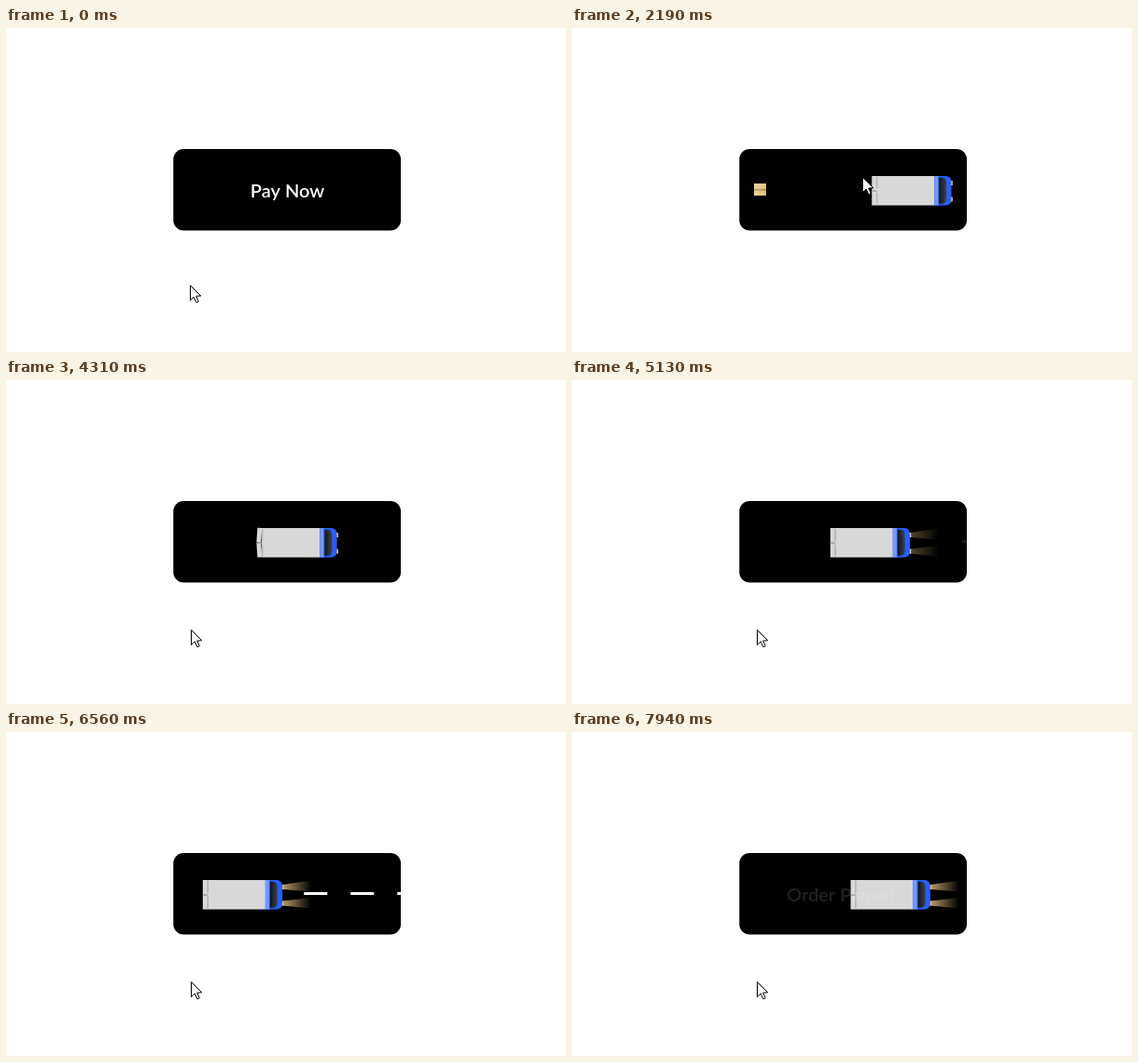
An HTML page with a canvas that plays this animation: 600x348 px, repeating every 8000 ms.

```html
<!DOCTYPE html>
<html lang="en">
<head>
<meta charset="utf-8">
<title>Pay button</title>
<style>
html, body { margin: 0; width: 100%; height: 100%; overflow: hidden; background: #fff; }
canvas { display: block; }
</style>
</head>
<body>
<canvas id="stage" width="600" height="348"></canvas>
<script>
const ctx = document.getElementById('stage').getContext('2d');
const LOOP = 8, FPS = 16;
const BUTTON = { x: 179.3, y: 130, w: 243.7, h: 87.5, r: 11 };
const FONT = '600 20px Lato, sans-serif';

const clamp = v => Math.min(1, Math.max(0, v));
const mix = (a, b, p) => a + (b - a) * p;
const ramp = (t, from, to) => clamp((t - from) / (to - from));

// CSS "ease": cubic-bezier(.25, .1, .25, 1)
function ease(x) {
  if (x <= 0 || x >= 1) return clamp(x);
  let lo = 0, hi = 1;
  for (let i = 0; i < 22; i++) {
    const s = (lo + hi) / 2;
    if (.75 * s - .75 * s * s + s ** 3 < x) lo = s; else hi = s;
  }
  return .3 * lo * (1 - lo) ** 2 + 3 * lo * lo * (1 - lo) + lo ** 3;
}
const smooth = x => x * x * (3 - 2 * x);

function track(t, keys, curve = ease) {
  if (t <= keys[0][0]) return keys[0][1];
  for (let i = 1; i < keys.length; i++) {
    const [t0, v0] = keys[i - 1], [t1, v1] = keys[i];
    if (t < t1) return mix(v0, v1, curve((t - t0) / (t1 - t0)));
  }
  return keys[keys.length - 1][1];
}

const truckX = t => t < 7.13
  ? track(t, [[1.86, 440], [2.66, 269.3], [4.6, 269.3], [5.8, 279.5], [7.3, 190]])
  : mix(191, 376, ease((t - 7.13) / 2.4));
const parcelX = t => track(t, [[1.86, 166], [2.62, 206], [3.2, 282]]);
const doorOpen = t => track(t, [[2.5, 0], [3.25, 1], [3.84, 1], [4.4, 0]]);
const cursorX = t => track(t, [[.64, 197], [1.31, 320], [2.06, 320], [2.19, 311], [2.72, 199], [3, 198]], smooth);
const cursorY = t => track(t, [[.64, 276], [1.31, 161], [2.06, 161], [2.19, 160], [2.72, 267], [3, 268]], smooth);

function rect(x, y, w, h, fill) {
  ctx.fillStyle = fill;
  ctx.fillRect(x, y, w, h);
}

function round(x, y, w, h, radii, fill) {
  ctx.beginPath();
  ctx.roundRect(x, y, w, h, radii);
  ctx.fillStyle = fill;
  ctx.fill();
}

function poly(points, fill) {
  ctx.beginPath();
  points.forEach(([x, y]) => ctx.lineTo(x, y));
  ctx.closePath();
  ctx.fillStyle = fill;
  ctx.fill();
}

function gradient(x0, x1, from, to) {
  const g = ctx.createLinearGradient(x0, 0, x1, 0);
  g.addColorStop(0, from);
  g.addColorStop(1, to);
  return g;
}

function label(text, x, align, alpha) {
  if (alpha <= 0) return;
  ctx.font = FONT;
  ctx.textAlign = align;
  ctx.fillStyle = `rgba(255,255,255,${alpha})`;
  ctx.fillText(text, x, 181.5);
}

function lines(t) {
  const alpha = ramp(t, 5.1, 5.35) * (1 - ramp(t, 7.3, 7.7));
  if (!alpha) return;
  const start = 423 - 400 * ease((t - 5.01) / 5);
  ctx.globalAlpha = alpha;
  for (let x = start; x < 424; x += 50) rect(x, 172, 25, 3, '#fff');
  ctx.globalAlpha = 1;
}

function parcel(x) {
  rect(x, 167, 13, 13, gradient(x, x + 13, '#edd09a', '#e2bd7c'));
  rect(x, 172.5, 13, 2.5, 'rgba(90,55,0,.2)');
  rect(x, 173.5, 13, 1, 'rgba(90,55,0,.2)');
}

function door(x, open, side) {
  const angle = mix(0, 1.47, open), thick = mix(5, 2.6, open);
  const along = [-Math.sin(angle) * 16, Math.cos(angle) * 15.7];
  const out = [-Math.cos(angle) * thick, -Math.sin(angle) * thick];
  const px = x + 5, py = mix(-15.7, -13.2, open);
  const point = (a, o) => [px + along[0] * a + out[0] * o, 174.7 + side * (py + along[1] * a + out[1] * o)];
  poly([point(0, 0), point(1, 0), point(1, 1), point(0, 1)], '#d8d8d8');
}

function truck(x, t) {
  const open = doorOpen(t);
  door(x, open, 1);
  door(x, open, -1);
  rect(x + 4.6, 159, 62.6, 31.5, '#d8d8d8');
  if (open < .05) {
    rect(x + 5, 160, 1, 12.5, '#aaa');
    rect(x + 5, 177, 1, 12.5, '#aaa');
    rect(x, 175, 5.5, 1, '#aaa');
  }

  const lit = ramp(t, 4.6, 5.8);
  for (const [y, top, bottom] of [[164, 159.5, 171.5], [181.5, 178, 189.5]]) {
    rect(x + 84.5, y, 2, 5, mix(0, 1, lit) > .7 ? '#e8d3a0' : '#f2dfa6');
    if (!lit) continue;
    ctx.globalAlpha = lit;
    poly([[x + 85.5, y], [x + 116, top], [x + 116, bottom], [x + 85.5, y + 5]],
      gradient(x + 85, x + 116, 'rgba(222,188,124,.85)', 'rgba(222,188,124,0)'));
    ctx.globalAlpha = 1;
  }

  round(x + 67, 159, 18.3, 31.5, [0, 6, 6, 0], '#275efe');
  rect(x + 67, 159, 5, 31.5, '#7699ff');
  rect(x + 71, 159, 1, 31.5, '#275efe');
  ctx.beginPath();
  ctx.moveTo(x + 72, 160.5);
  ctx.lineTo(x + 77, 161);
  ctx.quadraticCurveTo(x + 80, 162, x + 80, 167);
  ctx.lineTo(x + 80, 182.5);
  ctx.quadraticCurveTo(x + 80, 187.5, x + 77, 188.5);
  ctx.lineTo(x + 72, 189);
  ctx.closePath();
  ctx.fillStyle = gradient(x + 72, x + 80, '#10131a', '#3f424a');
  ctx.fill();
}

function cursor(x, y) {
  ctx.save();
  ctx.translate(x + .5, y + .5);
  ctx.lineWidth = 1;
  ctx.strokeStyle = '#000';
  poly([[0, 0], [0, 16], [3.7, 12.5], [6.4, 18.3], [8.8, 17.2], [6.2, 11.6], [11.3, 11.3]], '#fff');
  ctx.stroke();
  ctx.restore();
}

function draw(t) {
  rect(0, 0, 600, 348, '#fff');
  ctx.save();
  round(BUTTON.x, BUTTON.y, BUTTON.w, BUTTON.h, BUTTON.r, '#000');
  ctx.clip();
  label('Pay Now', 301.5, 'center', 1 - ease(ramp(t, 1.88, 2.16)));
  lines(t);
  if (t > 1.86 && t < 3.2) parcel(parcelX(t));
  if (t > 1.86) truck(truckX(t), t);
  label('Order Placed', 230, 'left', .13 * ramp(t, 7.75, 7.9));
  ctx.restore();
  cursor(Math.round(cursorX(t)), Math.round(cursorY(t)));
}

const begin = performance.now();
function tick() {
  const t = ((performance.now() - begin) / 1000) % LOOP;
  draw(Math.floor(t * FPS) / FPS);
  requestAnimationFrame(tick);
}
tick();
</script>
</body>
</html>
```
